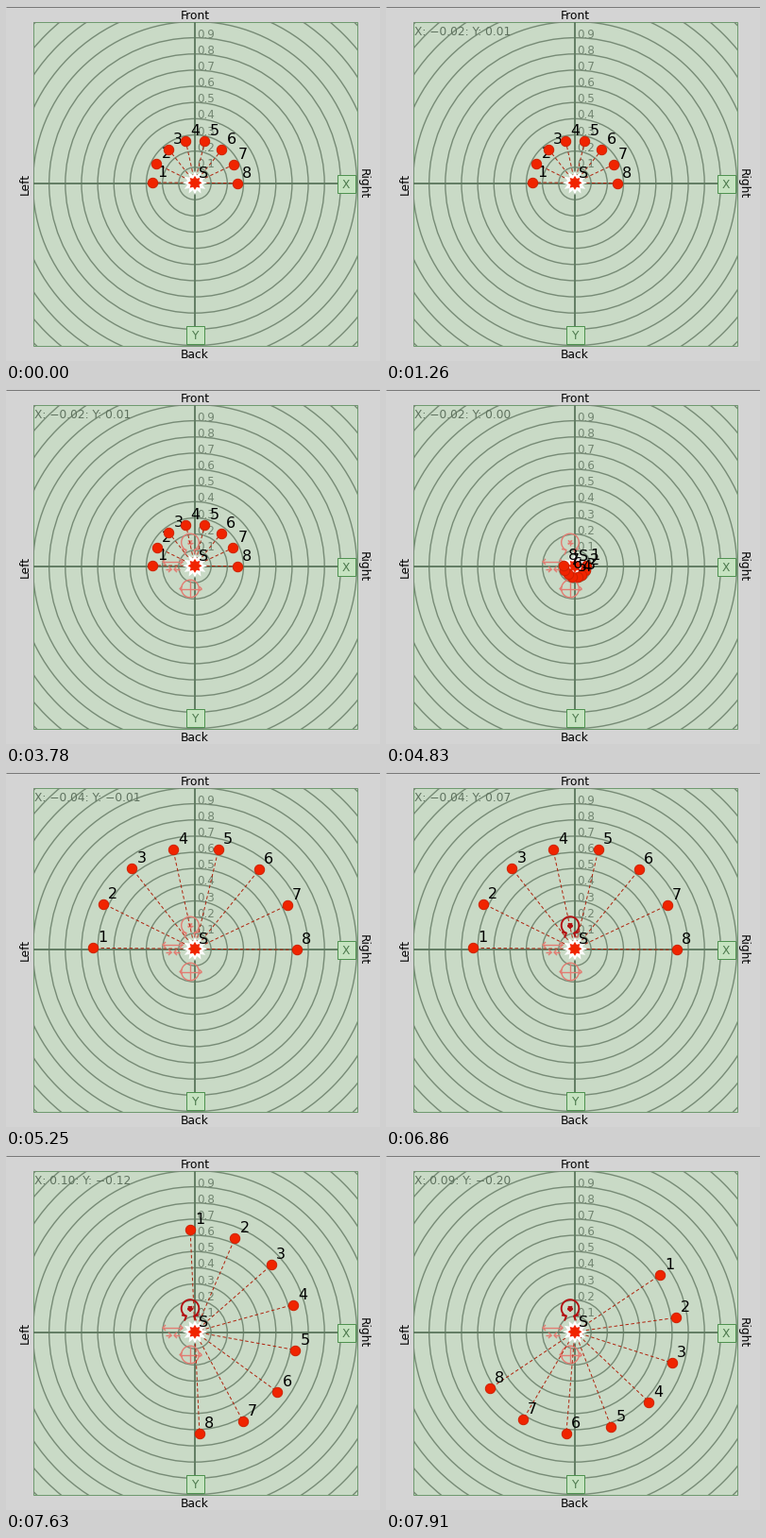
Recreate the animation shown at these times as a matplotlib script. Size 396 by 376 pixels, loop 8 s.

```python
import numpy as np
import matplotlib.pyplot as plt
from matplotlib.animation import FuncAnimation
from matplotlib.collections import LineCollection
from matplotlib.patches import Circle, Polygon, Rectangle

W, H, DPI = 396, 376, 64
PX = 72 / DPI                      # points per pixel
LOOP, STEP, TICK = 8000, 40, 70    # ms
UNIT = 171.5                       # pixels per 1.0 on the scale
CX, CY = 200, 188                  # grid centre
SX, SY = 200, 187.3                # source position
COUNT = 8

PANEL, FIELD = "#d4d4d4", "#c9dac6"
RING, AXIS, SCALE = "#778b76", "#5f7a60", "#728571"
GREEN, BUTTON = "#4f9250", "#c6e3c1"
RED, RIM, SPOKE = "#f02400", "#cf2000", "#b0250f"
PINK, ACTIVE = "#e27c72", "#b30f12"

plt.rcParams["font.family"] = "DejaVu Sans"
fig = plt.figure(figsize=(W / DPI, H / DPI), dpi=DPI, facecolor=PANEL)
ax = fig.add_axes([0, 0, 1, 1])
ax.set_xlim(0, W)
ax.set_ylim(H, 0)
ax.axis("off")


def label(x, y, text, size=12.2, color="black", z=5, **kw):
    kw = {"ha": "left", "va": "baseline", **kw}
    return ax.text(x, y, text, fontsize=size * PX, color=color, zorder=z, **kw)


def box(x, y, w, h, face, edge, z):
    return ax.add_patch(Rectangle((x, y), w, h, fc=face, ec=edge, lw=PX, zorder=z))


def line(xs, ys, color, width, z):
    ax.plot(xs, ys, color=color, lw=width * PX, zorder=z, solid_capstyle="butt")


def star(points, outer, inner, color, z):
    a = np.arange(2 * points) * np.pi / points - np.pi / 2
    r = np.where(np.arange(2 * points) % 2, inner, outer)
    xy = np.column_stack([SX + r * np.cos(a), SY + r * np.sin(a)])
    ax.add_patch(Polygon(xy, fc=color, ec="none", zorder=z))


def arc(x, y, r, start=0, end=360):
    a = np.radians(np.linspace(start, end, 50))
    return np.column_stack([x + r * np.cos(a), y + r * np.sin(a)])


def head(x, y, d, size=3):
    """Horizontal arrowhead with its tip at x, y, pointing along d."""
    return [(x - d * size, y - size), (x, y), (x - d * size, y + size)]


def handle(strokes):
    return ax.add_collection(
        LineCollection(strokes, colors=PINK, linewidths=1.4 * PX, zorder=4))


# Grid
line([0, W], [0.5, 0.5], "#777777", 1, 1)
field = box(28.5, 16.5, 343, 343, FIELD, "#6f9a6f", 1)
for k in range(1, 15):
    ring = ax.add_patch(Circle((CX, CY), k * UNIT / 10, fill=False, ec=RING,
                               lw=1.4 * PX, zorder=2))
    ring.set_clip_path(field)
line([29, 371], [CY, CY], AXIS, 1.9, 2)
line([CX, CX], [17, 359], AXIS, 1.9, 2)
for k in range(1, 10):
    label(202, CY - k * UNIT / 10, f"0.{k}", 12, SCALE, 3)

# Axis buttons and side names
for x, y, name in [(360, 188, "X"), (200, 348, "Y")]:
    box(x - 9.5, y - 9.5, 19, 19, BUTTON, GREEN, 3)
    label(x, y + 4.7, name, 12.2, "#4d7a4e", ha="center")
label(200, 13.7, "Front", ha="center")
label(200, 373, "Back", ha="center")
label(20.5, 188, "Left", ha="center", va="center", rotation=90)
label(378, 188, "Right", ha="center", va="center", rotation=-90)
readout = label(30, 31, "", 12.2, "#5f725f")

# Handles: rotate, scale, shift
tx, ty = 195, 162.5
spin = handle(
    [arc(tx, ty, 9.3, 118, 422),
     [(tx - 9, ty + 7), (tx - 4, ty + 8), (tx - 6, ty + 13)],
     [(tx + 9, ty + 7), (tx + 4, ty + 8), (tx + 6, ty + 13)]]
    + [[(tx - 3 * np.cos(a), ty - 3 * np.sin(a)),
        (tx + 3 * np.cos(a), ty + 3 * np.sin(a))]
       for a in np.arange(4) * np.pi / 4])
scale = handle(
    [[(166, 183), (187, 183)], head(166, 183, -1), head(187, 183, 1),
     [(169, 191), (175, 191)], head(175, 191, 1),
     [(184, 191), (178, 191)], head(178, 191, -1)])
shift = handle(
    [arc(195, 211.5, 9.3), [(184, 211.5), (207, 211.5)],
     head(184, 211.5, -1, 2.5), head(207, 211.5, 1, 2.5),
     [(195, 203), (195, 220)]])

# Speakers and source
spokes = ax.add_collection(
    LineCollection([], colors=SPOKE, linewidths=PX, zorder=5,
                   linestyles=[(0, (3.5, 2.5))]))
dots, tags = [], []
for k in range(COUNT):
    z = 8 + 0.1 * k
    dots += ax.plot([], [], "o", ms=10.4 * PX, mfc=RED, mec=RIM, mew=PX, zorder=z)
    tags.append(label(0, 0, str(k + 1), 16, z=z + 0.05))
star(12, 13, 8, "white", 6)
star(8, 7.5, 4.8, RED, 7)
label(SX + 4, SY - 5, "S", 16, z=7)

RADIUS = ([3710, 3780, 3850, 3920, 4200, 4760, 5040, 5110, 5250],
          [45.2, 44.7, 42, 42, -30, -30, 43, 43, 108])
TURN = ([7070, 7140, 7210, 7280, 7350, 7420, 7630, 7910],
        [0.5, 11, 24.1, 30, 34, 34, 87.4, 146.3])
MOUSE_T = [70, 280, 1190, 1260, 4760, 5040, 6790, 6930,
           7070, 7210, 7350, 7420, 7630, 7910]
MOUSE_X = [.90, -.03, -.03, -.02, -.02, -.04, -.04, -.03,
           -.03, .06, .08, .08, .10, .09]
MOUSE_Y = [-.90, -.01, -.01, .01, .01, -.01, -.01, .15,
           .15, .02, -.03, -.03, -.12, -.20]


def number(v):
    return f"{round(v, 2) + 0:.2f}".replace("-", "\u2212")


def update(i):
    t = (i * STEP + 30) // TICK * TICK
    mx, my = np.interp(t, MOUSE_T, MOUSE_X), np.interp(t, MOUSE_T, MOUSE_Y)
    readout.set_text(f"X: {number(mx)}: Y: {number(my)}" if t >= 70 else "")

    for h in (spin, scale, shift):
        h.set_visible(t >= 2660)
    hot = t >= 6860
    spin.set_color(ACTIVE if hot else PINK)
    spin.set_linewidth((1.9 if hot else 1.4) * PX)

    r = np.interp(t, *RADIUS)
    a = np.radians(180 - np.interp(t, *TURN) - np.arange(COUNT) * 180 / (COUNT - 1))
    xs, ys = SX + r * np.cos(a), SY - r * np.sin(a)
    spokes.set_segments([[(SX, SY), p] for p in zip(xs, ys)])
    for dot, tag, x, y in zip(dots, tags, xs, ys):
        dot.set_data([x], [y])
        tag.set_position((x + 5, y - 6))
    return [readout, spin, scale, shift, spokes, *dots, *tags]


anim = FuncAnimation(fig, update, frames=LOOP // STEP, interval=STEP,
                     repeat=True, repeat_delay=0, blit=False)
plt.show()
```
